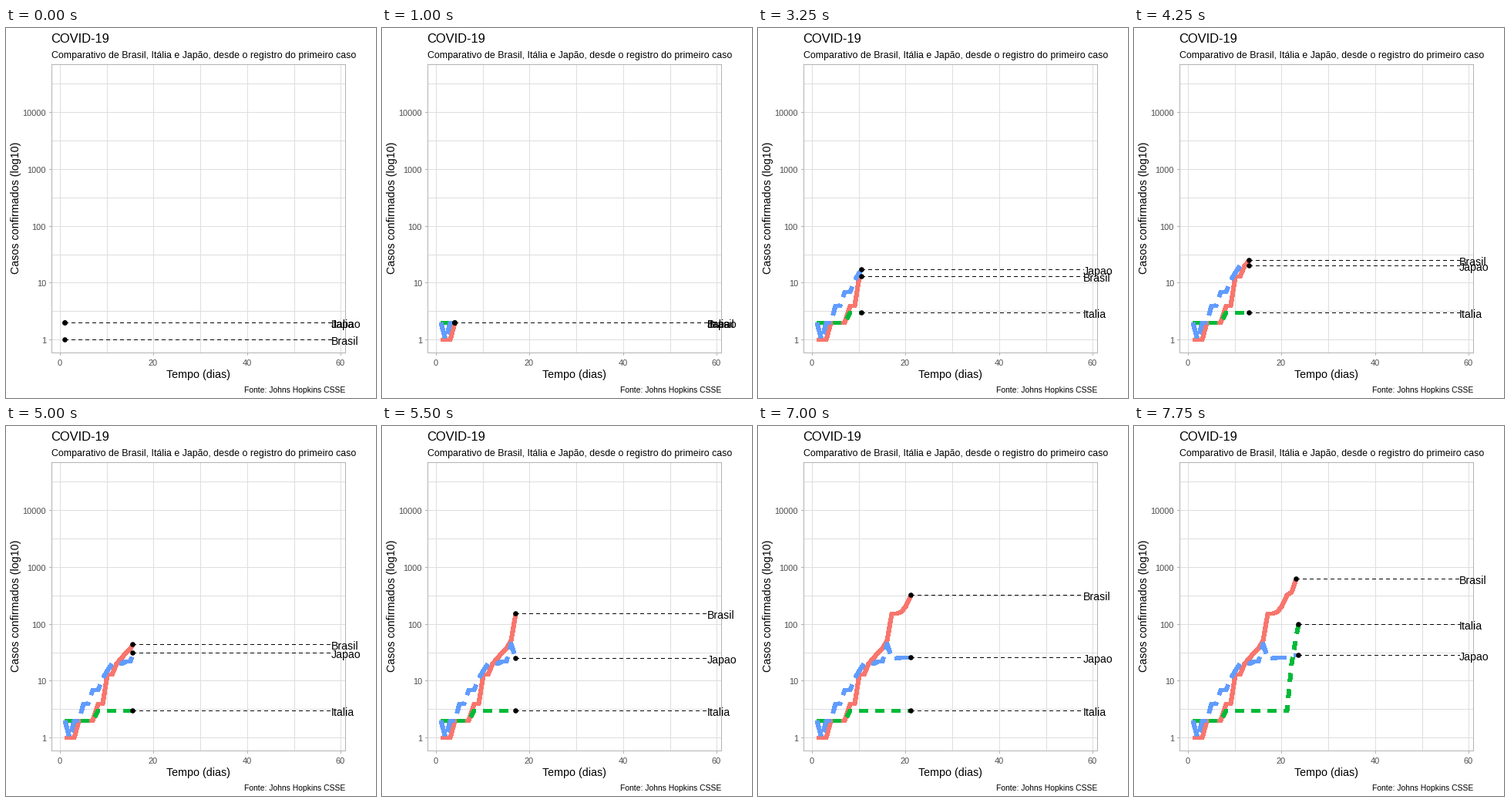
A matplotlib script for the animation above (8 s loop, 480 px wide and 480 px high).

```python
import numpy as np
import matplotlib.pyplot as plt
from matplotlib.animation import FuncAnimation
from matplotlib.patches import Circle, Rectangle

SIZE = 480
FRAMES, INTERVAL = 32, 250
LAST_DAY, REVEAL_STEPS = 58, 79
BLACK, GRID, FRAME, TICK = "#000000", "#DEDEDE", "#B3B3B3", "#4D4D4D"
LEFT, RIGHT, TOP, BOTTOM = 59.5, 440.5, 47.5, 421.5

# name, colour, dash pattern in line widths, cases per day
SERIES = [
    ("Brasil", "#F8766D", "-",
     [1, 1, 1, 2, 2, 2, 2, 4, 4, 13, 13, 20, 25, 31, 38, 52, 151, 151,
      162, 200, 321, 372, 621]),
    ("Italia", "#00BA38", (0, (2, 2)),
     [2] * 7 + [3] * 14 + [20, 62, 155]),
    ("Japao", "#619CFF", (0, (4, 2)),
     [2, 1, 2, 2, 4, 4, 7, 7, 11, 15, 20, 20, 20, 22, 22, 45, 25, 25,
      26, 26, 26, 28, 28, 29]),
]

plt.rcParams["font.family"] = "Liberation Sans"


def day_x(day):
    return np.floor(70.4 + 6.0766 * np.asarray(day)) + 0.5


def log_y(power):
    return np.floor(404.6 - 73.72 * np.asarray(power)) + 0.5


# Each day is reached on a whole step; steps between two days are tweened.
DAYS = np.arange(1, LAST_DAY + 1)
KNOTS = np.round((DAYS - 1) * REVEAL_STEPS / (LAST_DAY - 1))

fig = plt.figure(figsize=(SIZE / 72, SIZE / 72), dpi=72, facecolor="white")
ax = fig.add_axes([0, 0, 1, 1])
ax.set_xlim(0, SIZE)
ax.set_ylim(SIZE, 0)
ax.axis("off")

# Coordinates already sit on pixel centres, so snapping stays off.
CRISP = dict(antialiased=False, snap=False)


def rule(xs, ys, color):
    ax.plot(xs, ys, color=color, lw=1, zorder=1, solid_capstyle="butt",
            **CRISP)


def write(x, y, text, size, color=BLACK, ha="left"):
    return ax.text(x, y, text, fontsize=size, color=color, ha=ha,
                   va="baseline", zorder=8)


def draw_panel():
    for day in range(0, 61, 10):
        x = day_x(day)
        rule([x, x], [TOP, BOTTOM], GRID)
        if day % 20 == 0:
            rule([x, x], [BOTTOM, BOTTOM + 3.5], FRAME)
            write(x - 0.7, 438, str(day), 11, TICK, "center")
    for half in range(10):
        y = log_y(half / 2)
        rule([LEFT, RIGHT], [y, y], GRID)
        if half % 2 == 0:
            rule([LEFT - 3.5, LEFT], [y, y], FRAME)
            write(52, y + 4.5, str(10 ** (half // 2)), 11, TICK, "right")
    ax.add_patch(Rectangle((LEFT, TOP), RIGHT - LEFT, BOTTOM - TOP, fill=False,
                           ec=FRAME, lw=1, zorder=7, **CRISP))


def draw_titles():
    write(58, 19, "COVID-19", 16.5)
    write(59, 39, "Comparativo de Brasil, Itália e Japão, "
          "desde o registro do primeiro caso", 12.34)
    write(249.5, 454, "Tempo (dias)", 14.3, ha="center")
    write(440, 473, "Fonte: Johns Hopkins CSSE", 10.4, ha="right")
    ax.text(20, 233.5, "Casos confirmados (log10)", fontsize=14.3,
            rotation=90, ha="right", va="center")


class Country:
    def __init__(self, name, color, dash, cases):
        self.logs = np.log10(cases)
        self.days = np.arange(1, len(cases) + 1)
        self.curve, = ax.plot([], [], color=color, ls=dash, lw=5, zorder=3,
                              solid_capstyle="butt", dash_capstyle="butt",
                              solid_joinstyle="round", dash_joinstyle="round",
                              **CRISP)
        self.guide, = ax.plot([], [], color=BLACK, lw=1, ls=(0, (4, 4)),
                              zorder=4, dash_capstyle="butt", **CRISP)
        self.dot = ax.add_patch(Circle((0, 0), 3.3, fc=BLACK, lw=0, zorder=5))
        self.label = write(422, 0, name, 14.1)

    def show(self, day):
        day = min(day, self.days[-1])
        past = self.days < day
        xs = day_x(np.append(self.days[past], day))
        tip = np.interp(day, self.days, self.logs)
        ys = log_y(np.append(self.logs[past], tip))
        self.curve.set_data(xs, ys)
        self.guide.set_data([xs[-1] - 0.5, day_x(LAST_DAY)], [ys[-1], ys[-1]])
        self.dot.center = xs[-1], ys[-1]
        self.label.set_y(ys[-1] + 6.5)


draw_panel()
draw_titles()
countries = [Country(*row) for row in SERIES]


def update(frame):
    day = np.interp(frame, KNOTS, DAYS)
    for country in countries:
        country.show(day)
    return []


anim = FuncAnimation(fig, update, frames=FRAMES, interval=INTERVAL,
                     repeat=True, repeat_delay=0)
plt.show()
```
